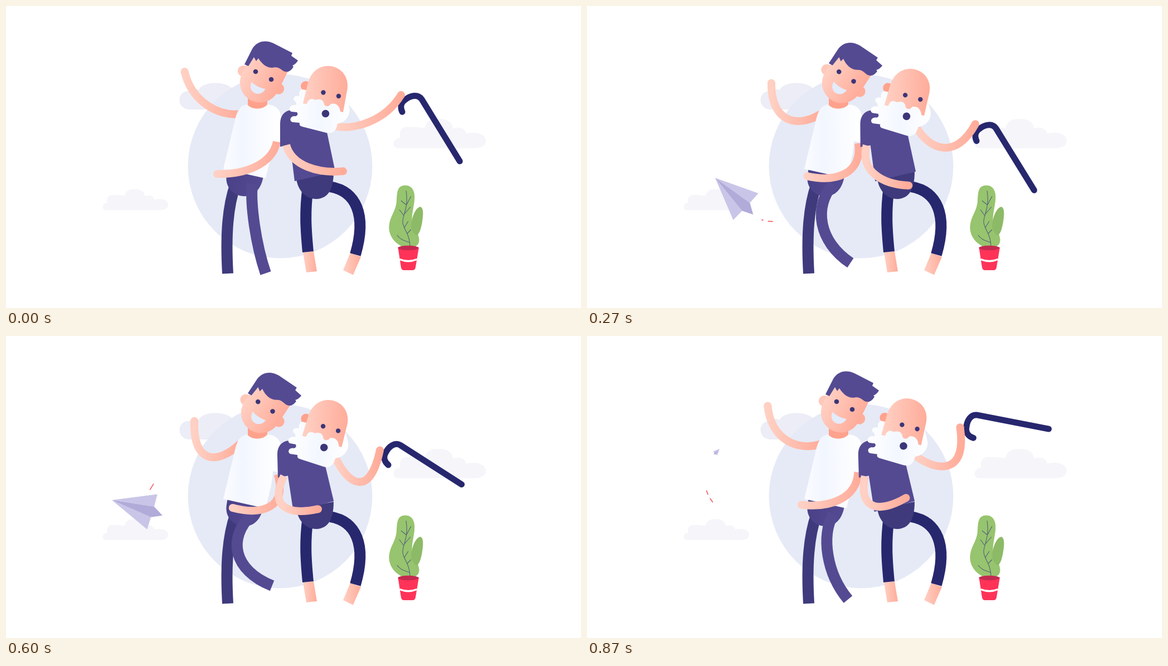
These frames come from a looping animation (1032x543 px, 900 ms). An HTML page with a canvas:

```html
<!DOCTYPE html>
<html lang="en">
<head>
<meta charset="utf-8">
<title>Two friends dancing</title>
<style>
html, body { margin: 0; width: 100%; height: 100%; overflow: hidden; background: #fff; }
canvas { display: block; }
</style>
</head>
<body>
<canvas id="stage" width="1032" height="543"></canvas>
<script>
const g = document.getElementById('stage').getContext('2d');
const { PI, sin, cos, abs, min, max, sqrt, sign, hypot } = Math;
const LOOP = 900, STEP = 30;
const PURPLE = '#544a92', NAVY = '#27276e', INK = '#3c3578', SHADE = '#3f3a7c';
const LIGHT = '#ffd0c3', WARM = '#ffac9a', PINK = '#ffa28d';

// Flight of the plane: time, nose x, nose y, heading.
const flight = [
  [0, 335, 385, 225], [120, 297, 368, 225], [270, 230, 309, 224],
  [390, 311, 245, 331], [500, 270, 215, 228], [600, 190, 295, 197],
  [660, 169, 250, 222], [750, 198, 197, 244], [870, 238, 203, 315]];

// Dashed trails: start time and a cubic curve.
const trails = [
  [210, 337, 387, 318, 390, 297, 380, 276, 355],
  [540, 270, 261, 241, 285, 265, 320, 296, 294],
  [780, 228, 302, 215, 285, 210, 272, 212, 250]];

const cloud = 'M8 53C-3 52-2 36 13 34 9 22 17 14 28 15 38 15 47 16 56 17 60 3 70 0 80 1' +
  ' 92-1 107 5 107 18 118 14 129 17 131 27 148 22 166 28 166 39 166 49 158 52 150 53Z';

const swing = (t, period) => (1 - cos(2 * PI * t / period)) / 2;

// Smooth interpolation through [time, ...values] rows.
function along(rows, t) {
  const last = rows.length - 1;
  let i = 0;
  while (i < last - 1 && t >= rows[i + 1][0]) i++;
  const h = rows[i + 1][0] - rows[i][0], u = (t - rows[i][0]) / h, v = 1 - u;
  return rows[i].map((a, c) => {
    const slope = j => {
      const p = rows[max(0, j - 1)], n = rows[min(last, j + 1)];
      return (n[c] - p[c]) / (n[0] - p[0]);
    };
    return a * v * v * (1 + 2 * u) + rows[i + 1][c] * u * u * (3 - 2 * u) +
      h * u * v * (slope(i) * v - slope(i + 1) * u);
  });
}

function blend(x0, x1, ...colors) {
  const paint = g.createLinearGradient(x0, 0, x1, 0);
  colors.forEach((c, i) => paint.addColorStop(i / (colors.length - 1), c));
  return paint;
}
function fill(d, color) {
  g.fillStyle = color;
  g.fill(new Path2D(d));
}
function line(d, color, width, cap = 'butt') {
  g.strokeStyle = color;
  g.lineWidth = width;
  g.lineCap = cap;
  g.stroke(new Path2D(d));
}
function dot(x, y, r, color) {
  g.fillStyle = color;
  g.beginPath();
  g.arc(x, y, r, 0, 7);
  g.fill();
}
function placed(x, y, deg, scale, draw) {
  g.save();
  g.translate(x, y);
  g.rotate(deg * PI / 180);
  g.scale(scale, scale);
  draw();
  g.restore();
}
function turned(x, y, deg, draw) {
  placed(x, y, deg, 1, () => { g.translate(-x, -y); draw(); });
}

// A limb of fixed reach: the closer its ends, the deeper it bows.
function limb(x, y, endX, endY, reach, skew) {
  const dx = endX - x, dy = endY - y, span = hypot(dx, dy);
  const bow = .62 * sqrt(max(0, reach ** 2 - span ** 2)) * sign(dx) / span;
  const knot = (s, k) => `${x + dx * s - dy * bow * k} ${y + dy * s + dx * bow * k}`;
  return `M${x} ${y}C${knot(.22, 1 + skew)} ${knot(.66, 1 - skew)} ${endX} ${endY}`;
}
function arm(x, y, handX, handY, reach, skew) {
  const skin = blend(min(x, handX), max(x, handX), LIGHT, WARM);
  line(limb(x, y, handX, handY, reach, skew), skin, 14);
  dot(handX, handY, 7, skin);
}

function scenery() {
  fill('M328 186C306 184 306 153 328 153 333 149 340 148 346 151 350 137 390 133 406 148L420 186Z', '#ecedf6');
  dot(492, 288, 165.5, '#e6eaf6');
  placed(695, 202.5, 0, 1, () => fill(cloud, '#f5f5fa'));
  placed(173, 329, 0, .711, () => fill(cloud, '#f5f5fa'));

  fill('M712 433C694 425 685 408 688 392 691 375 700 368 701 350 702 335 702 323 716 322.5' +
    ' 730 322 735 335 733 350 731 368 725 385 732 396 737 405 746 420 739 429L733 434Z', '#97c46e');
  fill('M743 361C750 362 749 376 747 388 745 400 742 410 737 413 727 405 726 396 728 388 730 375 736 363 743 361Z', '#8dba66');
  line('M725 432C725 410 712 400 712 388 712 375 723 362 718 332M719 357L727 342M719 358L709 350' +
    'M715 374L726 361M714 377L706 366M715 398L722 387M720 409L727 402M724 425C716 422 707 420 702 412', '#53627a', 1.1);
  fill('M703.5 434L709 470Q710 475 714 475H730Q734 475 735 470L741 434Z', '#ff3358');
  g.fillStyle = '#c42a4f';
  g.beginPath();
  g.ellipse(722, 435, 18.5, 4.2, 0, 0, 7);
  g.fill();
  line('M706.5 455.5Q722 462 737.5 455.5', '#fff', 3.4);
}

function youngHead() {
  placed(462, 125, 26.57, 1, () => {
    dot(-36, 9, 10, '#ffc8ba');
    dot(35, 9, 10, '#ffae9b');
    fill('M-36-28H36V14A36 36 0 0 1-36 14Z', blend(-36, 36, LIGHT, WARM));
    dot(-15.7, 0, 4.3, INK);
    dot(15.7, 0, 4.3, INK);
    fill('M-14 20Q0 24 14 20C13 40-13 40-14 20Z', '#e4ebfa');
  });
  fill('M428 105L442 77C450 64 464 60 480 67L514 84.5 512 89.5 524 98C521 103 517 106 514 107L516 109' +
    'C511 118 505 120 498 117 491 112 487 109 478 111 468 111 460 105 453 94L449 99 445 92 435 108Z', PURPLE);
}

function youngMan(t) {
  const s = swing(t, 1020);
  arm(420, 194, 320.5 + 19 * s, 118 + 37.5 * s, 135, -.12);
  line('M412 320C398 360 394 410 398 481', SHADE, 20);
  fill('M398 290L462 306C458 330 445 342 428 342 408 342 392 325 396 303Z', blend(396, 462, '#4a4189', PURPLE));
  line(limb(442, 320, 466 + 12.5 * s, 480.5 - 34 * s, 163, -.04), PURPLE, 20);
  fill('M434 163H469V180C462 187 441 187 434 180Z', PINK);
  fill('M433 177C440 187 462 187 469 177 484 178 493 186 493 200L492 246 479 243' +
    'C479 265 470 290 466 310L390 293 411 205C415 188 420 179 433 177Z',
    blend(390, 493, '#fbfcff', '#f2f6ff', '#f9fbff', '#fff'));
  arm(486 + 2 * s, 244 + 5 * s, 379 + 30 * s, 302 + 7.5 * s, 130, .15);
  turned(448, 155, 9.8 * swing(t, 870), youngHead);
}

function oldFace() {
  const white = blend(510, 616, '#fff', '#f3f7ff', '#fff');
  dot(538, 144, 9, PINK);
  fill('M533 150C526 150 525 158 527 162 519 160 513 165 518 171 522 172 520 177 522 178 510 176 505 186 512 190' +
    'L522 191C525 194 523 199 517 198 508 199 509 209 516 209L527 210C526 214 528 216 532 217L575 228' +
    'C585 230 590 226 593 219 595 214 594 212 597 211 610 209 619 195 616 182L611 165Z', white);
  fill('M541.5 140C547 117 564 106 582 108 604 111 616 130 612.5 150L605 191 533 175Z', blend(535, 613, LIGHT, WARM));
  fill('M530 178L540 176C543 166 549 166 555 169 563 166 570 168 571 177 574 182 580 181 583 176' +
    ' 590 174 598 177 600 189V206L560 215 530 200Z', white);
  dot(569.5, 155.5, 4.2, INK);
  dot(597, 162, 4.2, INK);
  dot(573.5, 193.5, 6.8, INK);
}

function oldMan(t) {
  const lean = swing(t, 1500), dip = sin(PI * t / 1100);
  const lift = min(1, max(0, (t - 330) / 420)) ** 1.6;

  fill('M533 443L552 441 558 477 539 479Z', blend(533, 558, LIGHT, WARM));
  fill('M618 444L637 451 623 483.5 605 475Z', blend(605, 637, LIGHT, WARM));
  line('M542 325C536 370 538 400 542 442', NAVY, 20);
  line('M582 325C628 333 648 375 627 447', NAVY, 20);
  fill('M521 311L588 298C588 330 578 346 557 347 536 347 524 330 521 311Z', SHADE);

  const handX = 709 - 42 * lean;
  const handY = 160 + 64 * sin(PI * (t / 970) ** .8) ** 2;
  const tilt = 55 - 44 * lift + 3.5 * (1 - lift) * cos(2 * PI * t / 260);
  placed(handX, handY, tilt, 1, () =>
    line('M156.6-27.6H26C14-27 10-14 11-3 11 6 17 13 27 14', NAVY, 11, 'round'));
  arm(590, 216, handX, handY, 138, -.15);

  turned(556, 400, -1.7 * lean, () =>
    fill('M492 253V212C492 197 500 188 512 187L522 186 575 222 591 298 518 315 510 250Z', PURPLE));
  placed(-5.5 * lift, 7 * dip, 0, 1, () => turned(573.5, 193.5, 3.6 * dip, oldFace));
  arm(503 - 4.5 * lean, 250 + 2 * lean,
    560 + 45 * abs(1 - t / 600) ** 1.6, 308.5 + 17.5 * cos(2 * PI * (t - 370) / 1020), 120, .15);
}

function paperPlane(t) {
  for (const [start, ...c] of trails) {
    const curve = s => [0, 1].map(k => {
      const v = 1 - s;
      return c[k] * v ** 3 + 3 * c[k + 2] * v * v * s + 3 * c[k + 4] * v * s * s + c[k + 6] * s ** 3;
    });
    for (let k = 0; k < 4; k++) {
      const age = t - start - 50 * k, s = .07 + .29 * k;
      const head = min(1, age / 40), tail = max(0, (age - 120) / 40);
      if (age <= 0 || tail >= 1) continue;
      line(`M${curve(s + .13 * tail)}L${curve(min(1, s + .13 * head))}`, '#f4606c', 1.7, 'round');
    }
  }
  const [, x, y, heading] = along(flight, t);
  const size = min(1, t / 200, (890 - t) / 130);
  placed(x, y, heading, size, () => {
    fill('M0 0L-75 34-76 11ZM0 0L-76-9-76-32Z', '#c9c5e8');
    fill('M0 0L-76 11-95 0-76-9Z', '#b0abd8');
  });
}

function frame(now) {
  const t = Math.floor(now % LOOP / STEP) * STEP;
  g.fillStyle = '#fff';
  g.fillRect(0, 0, 1032, 543);
  scenery();
  paperPlane(t);
  youngMan(t);
  oldMan(t);
  requestAnimationFrame(frame);
}
requestAnimationFrame(frame);
</script>
</body>
</html>
```
